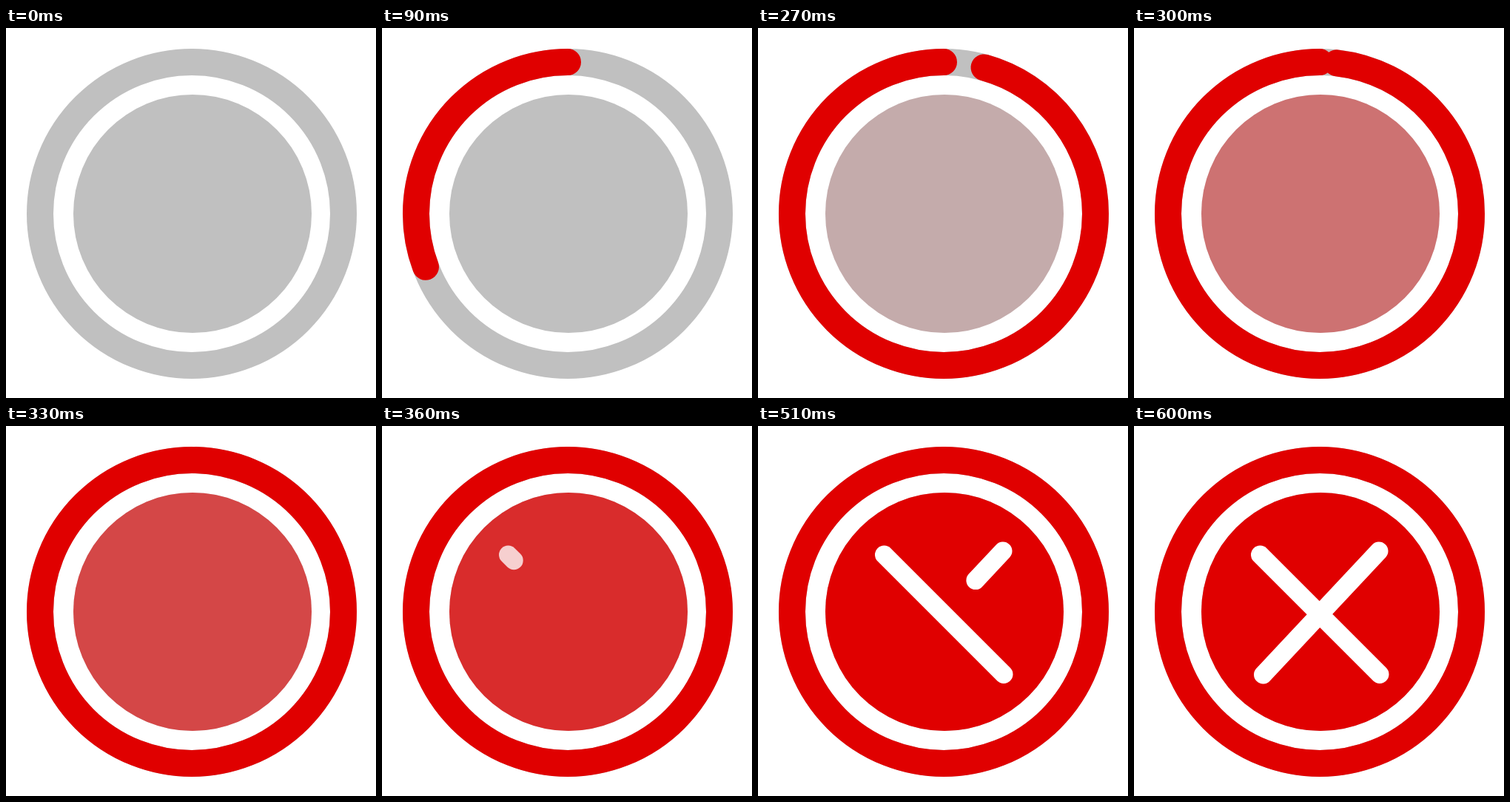
These frames come from a looping animation (500 px wide and 500 px high, 870 ms). An HTML page with a canvas:

```html
<!DOCTYPE html>
<html lang="en">
<head>
<meta charset="utf-8">
<title>Error badge</title>
<style>
html, body { margin: 0; width: 100%; height: 100%; overflow: hidden; background: #fff; }
canvas { display: block; width: 100vmin; height: 100vmin; }
</style>
</head>
<body>
<canvas id="stage" width="500" height="500"></canvas>
<script>
const ctx = document.getElementById('stage').getContext('2d');
const GRAY = '#c0c0c0', RED = '#e00000', WHITE = '#fff';
const LOOP = 870, STEP = 30, TOP = -Math.PI / 2, TAU = Math.PI * 2;

// Cubic bezier easing with control points (a, 0) and (b, 1)
function ease(a, b, x) {
  if (x <= 0) return 0;
  if (x >= 1) return 1;
  let lo = 0, hi = 1;
  for (let i = 0; i < 30; i++) {
    const u = (lo + hi) / 2, v = 1 - u;
    if (3 * v * v * u * a + 3 * v * u * u * b + u * u * u < x) lo = u;
    else hi = u;
  }
  return lo * lo * (3 - 2 * lo);
}

const sweep = t => ease(0.2, 0.17, (t - 30) / 330);
const fade = t => ease(0.22, 0.11, (t - 240) / 285);
const stroke = (t, start) => ease(0.58, 0.54, (t - start) / 150);

function disc(color) {
  ctx.fillStyle = color;
  ctx.beginPath();
  ctx.arc(252, 251, 161, 0, TAU);
  ctx.fill();
}

function ring(color, part) {
  if (part <= 0) return;
  ctx.strokeStyle = color;
  ctx.lineWidth = 36;
  ctx.beginPath();
  ctx.arc(251, 251, 205, TOP, TOP - TAU * part, true);
  ctx.stroke();
}

function line(x1, y1, x2, y2, part) {
  if (part <= 0) return;
  ctx.strokeStyle = WHITE;
  ctx.lineWidth = 25;
  ctx.beginPath();
  ctx.moveTo(x1, y1);
  ctx.lineTo(x1 + (x2 - x1) * part, y1 + (y2 - y1) * part);
  ctx.stroke();
}

function draw(t) {
  ctx.globalAlpha = 1;
  ctx.lineCap = 'round';
  ctx.fillStyle = WHITE;
  ctx.fillRect(0, 0, 500, 500);
  ring(GRAY, 1);
  disc(GRAY);
  ring(RED, sweep(t));
  ctx.globalAlpha = fade(t);
  disc(RED);
  line(170.5, 174, 332, 335.5, stroke(t, 330));
  line(331, 169, 174.5, 336, stroke(t, 450));
}

function tick() {
  const t = performance.now() % LOOP;
  draw(Math.floor((t + 0.01) / STEP) * STEP);
  requestAnimationFrame(tick);
}
tick();
</script>
</body>
</html>
```
